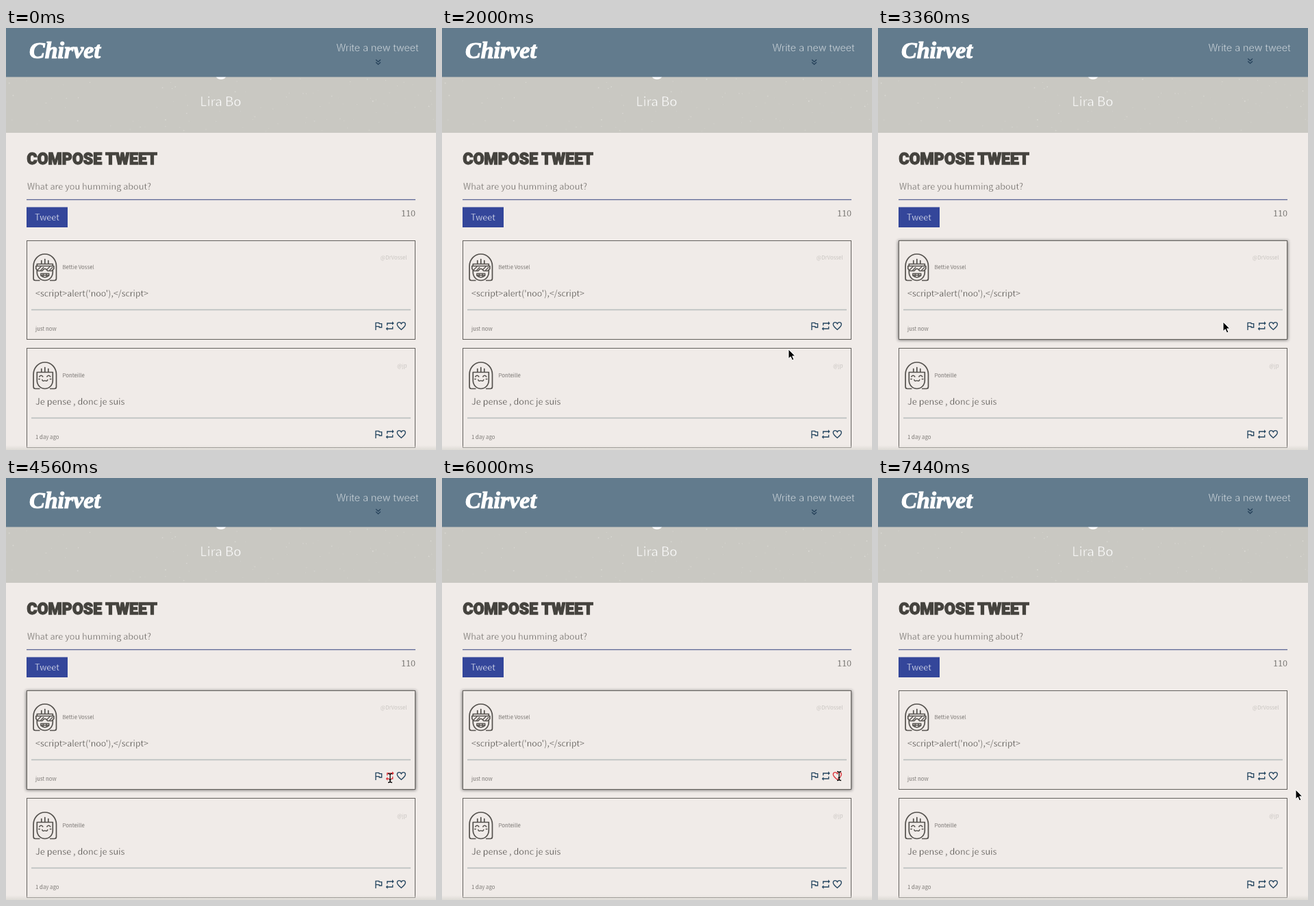
Write an HTML page that moves like this. It is 628 px wide and 616 px high and loops after 7.52 s.

```html
<!DOCTYPE html>
<html lang="en">
<head>
<meta charset="utf-8">
<title>Chirvet</title>
<style>
html, body { margin: 0; width: 100%; height: 100%; overflow: hidden; background: #f0ebe8; }
svg { display: block; width: 100%; height: 100%; }
/* a thin stroke in the background colour makes the letters lighter */
text { font: 300 12.7px "Noto Sans CJK JP", "Noto Sans CJK SC", "Noto Sans CJK", "Open Sans", sans-serif; fill: #45433f; stroke: #f0ebe8; stroke-width: .32; white-space: pre; }
.logo { font: italic 700 34px "Liberation Serif", "Noto Serif", serif; fill: #fff; stroke: #fff; stroke-width: 1.2; }
.nav { font: 300 14.4px Inter, "Open Sans", sans-serif; fill: #fff; stroke: #627b8d; }
.user { font-size: 18.7px; fill: #fff; stroke: #c9c8c2; stroke-width: .5; }
.title { font: 900 23.1px Roboto, Inter, sans-serif; fill: #45433e; stroke: #45433e; stroke-width: 1.3; }
.hint { fill: #66625e; }
.button { fill: #fff; stroke: #34469a; }
.code { font-size: 12.4px; }
.small { font-size: 7.8px; fill: #55524e; stroke-width: .2; }
.handle { font-size: 7.8px; fill: #bdb9b5; stroke-width: .2; }
.line { fill: none; stroke: currentColor; }
.icon { color: #24455f; }
.face { color: #55524e; stroke-width: 1.7; stroke-linecap: round; stroke-linejoin: round; }
</style>
</head>
<body>
<svg viewBox="0 0 628 616" preserveAspectRatio="none">
  <defs>
    <filter id="blur" x="-10%" y="-20%" width="120%" height="140%"><feGaussianBlur stdDeviation="2.2"/></filter>
    <linearGradient id="fade" x2="0" y2="1">
      <stop offset="0" stop-color="#dedbd6" stop-opacity="0"/>
      <stop offset="1" stop-color="#dedbd6"/>
    </linearGradient>
    <g id="flag" class="line" stroke-width="2"><path d="M6 21V5H13.2L13.6 7H19V15H13.8L13.4 13H6"/></g>
    <g id="repeat"><path fill="currentColor" d="M7 7h10v3l4-4-4-4v3H5v6h2zM17 17H7v-3l-4 4 4 4v-3h12v-6h-2z"/></g>
    <g id="heart" class="line" stroke-width="2"><path d="M12 20C7 15.5 3 12.3 3 8.5C3 6 5 4 7.5 4C9.2 4 11 5 12 7C13 5 14.8 4 16.5 4C19 4 21 6 21 8.5C21 12.3 17 15.5 12 20Z"/></g>
    <g id="head" class="line face">
      <path d="M-8 19H-14Q-16.7 19 -16.7 16V-2A16.7 17.5 0 0 1 16.7 -2V16Q16.7 19 14 19H8"/>
      <path d="M-11.5 -5V7A11.5 12 0 0 0 11.5 7V-5ZM-5 -5V-10M0 -5V-12M5 -5V-10"/>
    </g>
    <g id="shades" class="line face">
      <path fill="#f0ebe8" d="M-13 -2H13V2L10 5H4L1 2H-1L-4 5H-10L-13 2Z"/>
      <path stroke-width="1.3" d="M-10 3L-6 -1M-6 4L-2 0M3 3L7 -1M7 4L11 0"/>
      <path stroke-width="1.4" d="M-6 9H6V12Q0 17 -6 12ZM-2.5 9V14M2.5 9V14M-6 11.5H6"/>
    </g>
    <g id="smile" class="line face">
      <path stroke-width="1.5" d="M-8 1.5Q-5.5 -2 -3 1.5M3 1.5Q5.5 -2 8 1.5M-4 6Q-3 9 0 7Q3 9 4 6M-9 5H-7.5M7.5 5H9"/>
    </g>
  </defs>

  <rect width="628" height="616" fill="#f0ebe8"/>
  <rect y="71" width="628" height="82" fill="#c9c8c2"/>
  <g id="specks" fill="#e4e3de"></g>
  <ellipse cx="314" cy="69" rx="8" ry="6" fill="#fff"/>
  <rect width="628" height="71.5" fill="#627b8d"/>
  <text class="logo" x="34" y="44">Chirvet</text>
  <text class="nav" x="482.5" y="34">Write a new tweet</text>
  <path id="chevron" class="line" color="#233f58" stroke-width="1.3" d="M-3.4 -3.4L0 -.2L3.4 -3.4M-3.4 .4L0 3.6L3.4 .4"/>
  <text class="user" x="313.5" y="114" text-anchor="middle">Lira Bo</text>

  <text class="title" x="30.5" y="198.5">COMPOSE TWEET</text>
  <text class="hint" x="31" y="236">What are you humming about?</text>
  <rect x="30" y="249.9" width="568" height="1.3" fill="#5d6796"/>
  <rect x="30" y="261.5" width="60" height="29.5" fill="#34469a"/>
  <text class="button" x="60" y="280.5" text-anchor="middle">Tweet</text>
  <text x="598" y="275" text-anchor="end">110</text>

  <g id="cards"></g>
  <rect y="609" width="628" height="7" fill="url(#fade)"/>

  <g id="cursor">
    <path id="arrow" fill="#000" stroke="#fff" stroke-width="1" d="M0 0V13.6L3.2 10.8L5.5 16L7.9 15L5.7 9.9H9.8Z"/>
    <g id="beam" class="line">
      <path stroke="#fff" stroke-opacity=".7" stroke-width="2.6" d="M0 -6V6"/>
      <path stroke="#000" stroke-width="1.3" d="M-3 -6.5Q0 -6.5 0 -4.5V4.5Q0 6.5 -3 6.5M3 -6.5Q0 -6.5 0 -4.5M0 4.5Q0 6.5 3 6.5M-1.5 2.5H1.5"/>
    </g>
  </g>
</svg>
<script>
const LOOP = 7520, STEP = 80;
const $ = id => document.getElementById(id);

// pointer: time, x, y
const path = [
  [880, 562, 335], [1120, 546, 386], [1600, 520, 440], [1840, 508, 461],
  [2000, 506, 469], [2320, 501, 510], [2560, 500, 482], [2720, 501, 452],
  [3040, 503, 434], [3360, 504, 429], [3680, 528, 433], [3920, 544, 436],
  [4240, 545, 437], [4480, 561, 438], [5040, 561, 438], [5360, 577, 436],
  [5600, 580, 435], [6400, 580, 435], [6720, 592, 445], [7040, 610, 455]
];
const beamTime = [3840, 6560];
const hovers = [[[880, 1840], [2640, 6800]], [[2080, 2560]]];
const iconHovers = { flag: [3840, 4320], repeat: [4400, 5120], heart: [5280, 6560] };

const cards = [
  { top: 310.5, h: 144, y: 349, face: "shades", name: "Bettie Vossel", handle: "@DrVossel",
    body: "&lt;script&gt;alert('noo'),&lt;/script&gt;", style: "code", age: "just now" },
  { top: 467.5, h: 145, y: 507, face: "smile", name: "Ponteille", handle: "@jp",
    body: "Je pense , donc je suis", style: "quote", age: "1 day ago" }
];

function icon(name, x, card) {
  return `<use href="#${name}" id="${name}${card}" class="icon" transform="translate(${x} 78) scale(.667)"/>`;
}

$("cards").innerHTML = cards.map((c, i) => `
  <g id="glow${i}">
    <rect x="29.5" y="${c.top}" width="569" height="${c.h + 1}" fill="#333" opacity=".75" filter="url(#blur)"/>
  </g>
  <rect x="30.5" y="${c.top}" width="567" height="${c.h}" fill="#f0ebe8" stroke="#63605c"/>
  <g transform="translate(0 ${c.y - 349})">
    <g transform="translate(56.8 349.5)"><use href="#head"/><use href="#${c.face}"/></g>
    <text class="small" x="82.5" y="352">${c.name}</text>
    <text class="handle" x="585.5" y="338" text-anchor="end">${c.handle}</text>
    <text class="${c.style}" x="43" y="391.5">${c.body}</text>
    <rect x="37" y="410.5" width="554" height="1.7" fill="#bcc0c0"/>
    <text class="small" x="43" y="442">${c.age}</text>
    <g transform="translate(0 349)">
      ${icon("flag", 536, i)}${icon("repeat", 552.7, i)}${icon("heart", 569.3, i)}
    </g>
  </g>`).join("");

let seed = 11;
const rand = () => (seed = seed * 16807 % 2147483647) / 2147483647;
let specks = "";
for (let i = 0; i < 110; i++) {
  const x = rand() * 628, y = 73 + rand() * 78;
  specks += `<circle cx="${x.toFixed(1)}" cy="${y.toFixed(1)}" r="${(.4 + rand() * .6).toFixed(2)}" opacity="${(.2 + rand() * .5).toFixed(2)}"/>`;
}
$("specks").innerHTML = specks;

const within = (t, [a, b]) => t >= a && t < b;
const show = (id, on) => $(id).setAttribute("opacity", +on);
const move = (id, x, y) => $(id).setAttribute("transform", `translate(${x} ${y})`);
const ramp = v => Math.max(0, Math.min(1, v));

function pointerAt(t) {
  const n = path.findIndex(p => p[0] > t);
  if (n < 1) return path[n < 0 ? path.length - 1 : 0].slice(1);
  const a = path[n - 1], b = path[n], k = (t - a[0]) / (b[0] - a[0]);
  return [a[1] + (b[1] - a[1]) * k, a[2] + (b[2] - a[2]) * k];
}

function draw(t) {
  move("chevron", 543.6, 49 - Math.cos(2 * Math.PI * (t / 1000 - .35)));

  show("cursor", t >= path[0][0]);
  move("cursor", ...pointerAt(t));
  const beam = within(t, beamTime);
  show("arrow", !beam);
  show("beam", beam);

  hovers.forEach((spans, i) => {
    const glow = spans.map(([a, b]) => Math.min(ramp((t - a) / 160), ramp(1 - (t - b) / 160)));
    show("glow" + i, Math.max(...glow));
  });
  for (const name in iconHovers) {
    $(name + 0).style.color = within(t, iconHovers[name]) ? "#dc343b" : "";
  }
}

const start = performance.now();
function frame() {
  const t = (performance.now() - start) % LOOP;
  draw(Math.floor(t / STEP) * STEP);
  requestAnimationFrame(frame);
}
frame();
</script>
</body>
</html>
```
